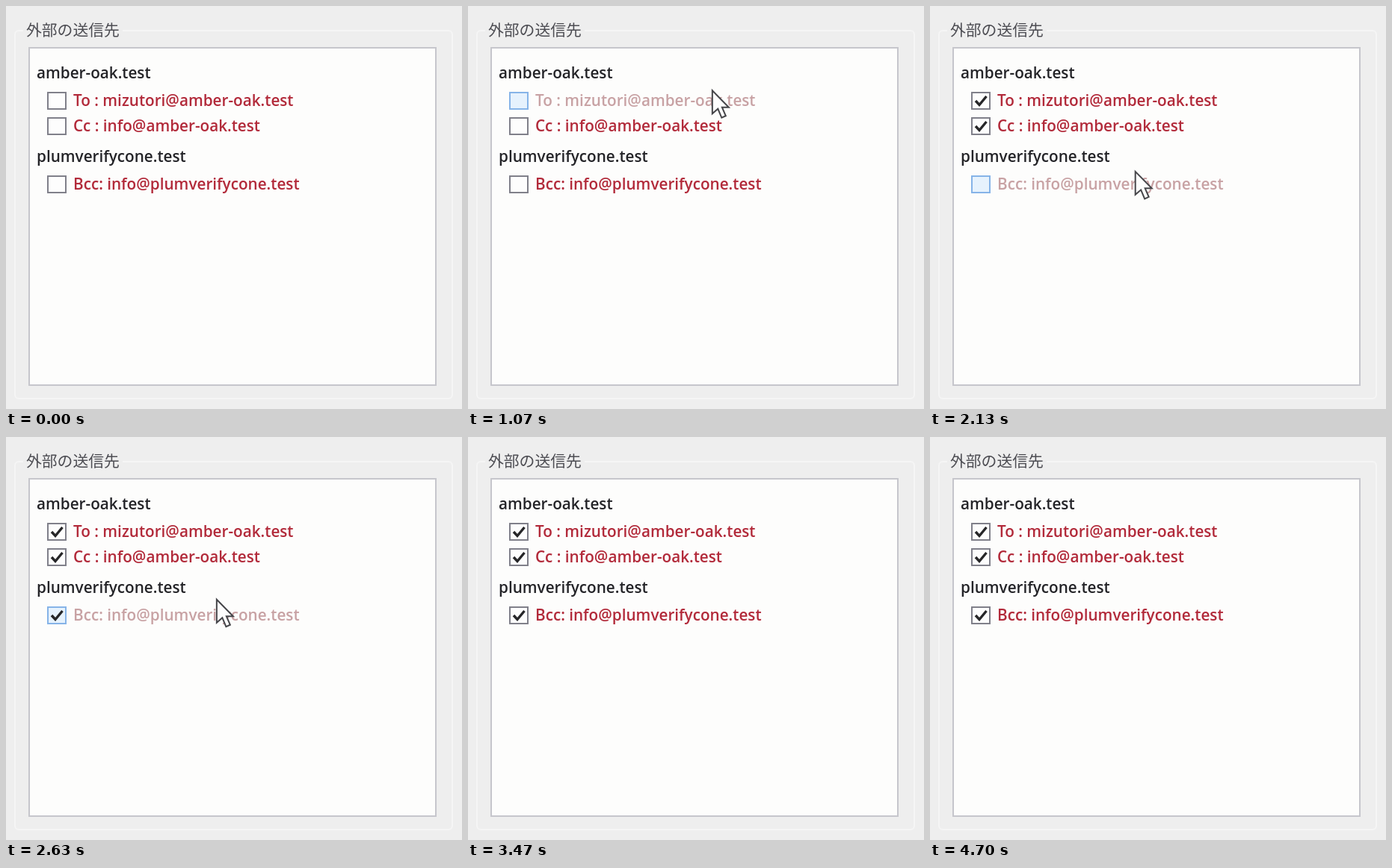
Recreate the animation shown at these times as an HTML page with a canvas. Size 610x540 px, loop 4730 ms.

```html
<!DOCTYPE html>
<html lang="ja">
<head>
<meta charset="utf-8">
<title>外部の送信先</title>
<style>
  html, body { margin: 0; width: 100%; height: 100%; overflow: hidden; background: #eee; }
  canvas { display: block; }
</style>
</head>
<body>
<canvas id="stage" width="610" height="540"></canvas>
<script>
const LOOP = 4730;
const FIRST_MOVE = 717, MOVE_EVERY = 609, CLICK_LEAD = 90;
const ctx = document.getElementById('stage').getContext('2d');
const LATIN = '600 20.7px "Open Sans", "Noto Sans", sans-serif';
const JAPANESE = '20.8px "Noto Sans CJK JP", "Noto Sans CJK", sans-serif';

const groups = {
  'amber-oak.test': ['To : mizutori', 'Cc : info'],
  'plumverifycone.test': ['Bcc: info']
};

// Offscreen, one rest per row, offscreen
const stops = [
  { x: 470, y: -40 }, { x: 314, y: 127 }, { x: 296, y: 165 }, { x: 269, y: 237 }, { x: 455, y: -42 }
];

const moveStart = leg => FIRST_MOVE + leg * MOVE_EVERY;
const smooth = k => k * k * (3 - 2 * k);

function pointerAt(time) {
  const leg = Math.floor((time - FIRST_MOVE) / MOVE_EVERY);
  if (leg < 0) return stops[0];
  if (leg >= stops.length - 1) return stops.at(-1);
  const from = stops[leg], dx = stops[leg + 1].x - from.x, dy = stops[leg + 1].y - from.y;
  const duration = 200 + Math.hypot(dx, dy);
  const k = smooth(Math.min(1, (time - moveStart(leg)) / duration));
  return { x: from.x + dx * k, y: from.y + dy * k };
}

function label(text, x, baseline, color, font = LATIN) {
  ctx.font = font;
  ctx.fillStyle = color;
  ctx.fillText(text, x, baseline);
}

function stroke(color, width) {
  ctx.strokeStyle = color;
  ctx.lineWidth = width;
  ctx.stroke();
}

function box(x, y, w, h, fill, border) {
  ctx.beginPath();
  ctx.rect(x, y, w, h);
  ctx.fillStyle = fill;
  ctx.fill();
  stroke(border, 2);
}

function drawFrame() {
  ctx.fillStyle = '#eee';
  ctx.fillRect(0, 0, 610, 540);
  ctx.beginPath();
  ctx.roundRect(12, 33, 585, 493, 5);
  stroke('#f5f5f5', 2);
  ctx.fillStyle = '#eee';
  ctx.fillRect(23, 20, 133, 26);
  label('外部の送信先', 27, 40, '#4c4c52', JAPANESE);
  box(31, 56, 544, 452, '#fdfdfc', '#c6c6cc');
}

function drawRow(text, y, checked, pointer) {
  ctx.font = LATIN;
  const right = 90 + ctx.measureText(text).width;
  const reach = y - pointer.y;
  const hover = pointer.x > 54 && pointer.x < right && reach > -11 && reach <= 23;

  box(56, y - 11, 24, 22, hover ? '#e6f2fd' : '#fdfdfd', hover ? '#86b4e8' : '#80808a');
  if (checked) {
    ctx.beginPath();
    ctx.moveTo(61, y);
    ctx.lineTo(66, y + 5.5);
    ctx.lineTo(75.5, y - 6);
    stroke('#262628', 3.4);
  }
  label(text, 90, y + 7.2, hover ? '#c8a2a4' : '#b22a3a');
}

function drawList(time, pointer) {
  let y = 89, index = 0;
  for (const [domain, recipients] of Object.entries(groups)) {
    label(domain, 41, y + 7.5, '#242428');
    y += 38;
    for (const recipient of recipients) {
      const clickTime = moveStart(++index) - CLICK_LEAD;
      drawRow(`${recipient}@${domain}`, y, time >= clickTime, pointer);
      y += 34;
    }
    y += 6;
  }
}

function drawPointer({ x, y }) {
  ctx.save();
  ctx.translate(x, y);
  ctx.fillStyle = '#fdfdfd';
  const arrow = new Path2D('M0 0V31L7.5 24.5L12.5 36.5L18 34L13 22.5H22Z');
  ctx.fill(arrow);
  ctx.strokeStyle = '#46464a';
  ctx.lineWidth = 2;
  ctx.stroke(arrow);
  ctx.restore();
}

let start;
function render(now) {
  start ??= now;
  const time = (now - start) % LOOP;
  const pointer = pointerAt(time);
  drawFrame();
  drawList(time, pointer);
  drawPointer(pointer);
  requestAnimationFrame(render);
}
requestAnimationFrame(render);
</script>
</body>
</html>
```
